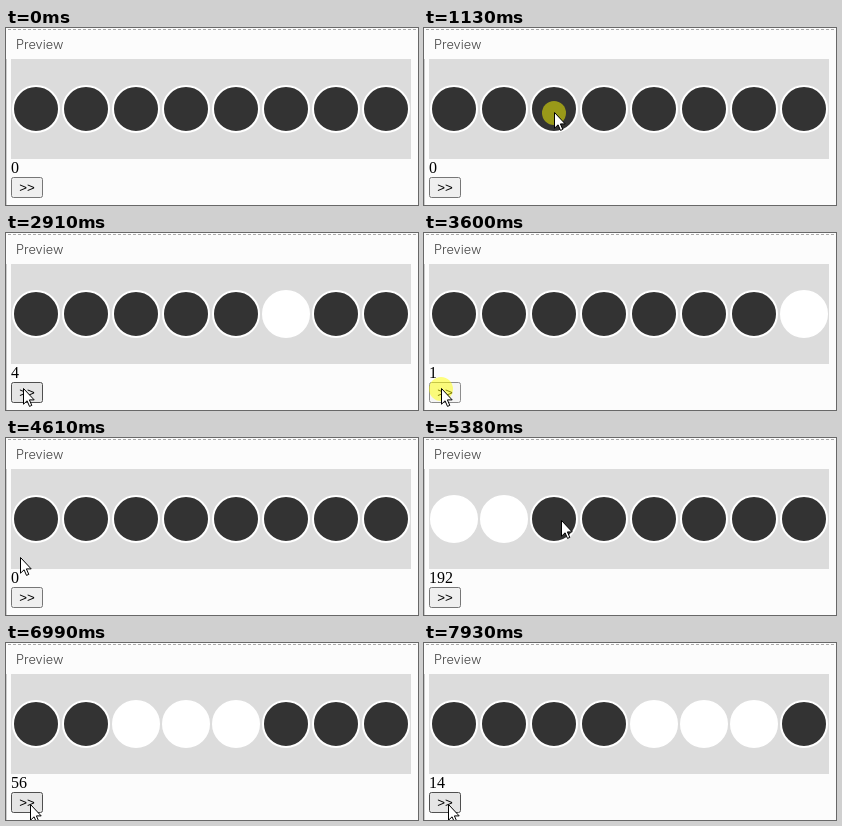
Animation of 412x177 px, one loop 8 s. Source, as an HTML page:

```html
<!DOCTYPE html>
<html lang="en">
<head>
<meta charset="utf-8">
<title>Bit shift preview</title>
<style>
  html, body { margin: 0; width: 100%; height: 100%; overflow: hidden; background: #fcfcfc; }
  svg { display: block; width: 100vw; height: 100vh; }
  #title { font: 300 12.8px Inter, sans-serif; fill: #444; }
  #number { font: 16px "Liberation Serif", serif; }
  #label { font: 13.333px "Liberation Sans", sans-serif; text-anchor: middle; }
</style>
</head>
<body>
<svg viewBox="0 0 412 177">
  <rect width="412" height="177" fill="#fcfcfc"/>
  <path d="M2 1.5H412" stroke="#aaa" stroke-dasharray="3 2"/>
  <path d="M.5 31V177" stroke="#ccc"/>
  <text id="title" x="10" y="21">Preview</text>
  <rect x="5" y="31" width="400" height="100" fill="#dcdcdc"/>
  <g id="bulbs" stroke="#fff" stroke-width="2"></g>
  <text id="number" x="5" y="145">0</text>
  <rect id="button" x="5.5" y="149.5" width="31" height="20" rx="2"/>
  <text id="label" x="21" y="164">&gt;&gt;</text>
  <g id="pointer">
    <circle id="glow" cy="1" r="12" fill="#ff0" fill-opacity=".5"/>
    <path d="M.5.5V16.2L4.1 12.8 6.5 18.4 8.8 17.4 6.4 11.9H11.2Z" fill="#fff" stroke="#000"/>
  </g>
</svg>
<script>
const $ = id => document.getElementById(id);
const LOOP = 8000, STEP = 77;

const bulbs = Array.from({ length: 8 }, (_, i) => {
  const bulb = document.createElementNS('http://www.w3.org/2000/svg', 'circle');
  bulb.setAttribute('cx', 30 + 50 * i);
  bulb.setAttribute('cy', 81);
  bulb.setAttribute('r', 23);
  return $('bulbs').appendChild(bulb);
});

const timeline = [{ time: 0, x: 237, y: 159, visible: false, down: false, value: 0 }];
const last = () => timeline[timeline.length - 1];
const after = (time, steps) => Math.floor((time + steps * STEP) / 10) * 10;
const set = (time, change) => timeline.push({ ...last(), ...change, time });

function glide(time, steps, x, y) {
  const from = last();
  for (let i = 1; i <= steps; i++) {
    const p = i / steps;
    set(after(time, i - 1), {
      x: from.x + (x - from.x) * p,
      y: from.y + (y - from.y) * p,
      visible: true
    });
  }
}

function click(time, delay, hold, nextValue) {
  if (delay) set(time, { down: true });
  set(after(time, delay), { down: true, value: nextValue(last().value) });
  set(after(time, delay + hold), { down: false });
}

const shift = value => value >> 1;
const toggle = bulb => value => value ^ (128 >> bulb);

glide(590, 7, 130, 84);
click(1130, 1, 1, toggle(2));
glide(1450, 4, 20, 155);
click(1760, 1, 1, shift);
glide(1990, 1, 18, 155);
click(2290, 1, 1, shift);
glide(2530, 1, 17, 155);
click(2750, 1, 1, shift);
click(3220, 1, 1, shift);
click(3600, 0, 2.3, shift);
glide(3770, 1, 16, 157);
glide(4150, 1, 15, 158);
click(4150, 1, 1, shift);
glide(4530, 2, 14, 119);
glide(4690, 1, 25, 88);
click(4760, 1, 1, toggle(0));
glide(4910, 3, 92, 82);
click(5150, 1, 1, toggle(1));
glide(5380, 1, 137, 82);
glide(5460, 1, 140, 82);
click(5460, 1, 1, toggle(2));
glide(5610, 7, 24, 161);
click(6300, 1, 1, shift);
click(6840, 1, 1, shift);
click(7390, 0, 1, shift);
click(7850, 0, 1, shift);

const BUTTON_LOOK = {
  idle: ['#efefef', '#767676'],
  hover: ['#e5e5e5', '#4f4f4f'],
  active: ['#f5f5f5', '#8d8d8d']
};

function draw(now) {
  const time = now % LOOP;
  const { x, y, visible, down, value } = timeline.findLast(state => state.time <= time);
  const over = visible && x >= 5 && x <= 37 && y >= 149 && y <= 170;
  const [fill, stroke] = BUTTON_LOOK[over ? (down ? 'active' : 'hover') : 'idle'];

  bulbs.forEach((bulb, i) => bulb.setAttribute('fill', value & (128 >> i) ? '#fff' : '#333'));
  $('number').textContent = value;
  $('button').setAttribute('fill', fill);
  $('button').setAttribute('stroke', stroke);
  $('pointer').setAttribute('transform', `translate(${Math.round(x)} ${Math.round(y)})`);
  $('pointer').setAttribute('visibility', visible ? 'visible' : 'hidden');
  $('glow').setAttribute('opacity', down ? 1 : 0);
}

const start = performance.now();
function tick() {
  draw(performance.now() - start);
  requestAnimationFrame(tick);
}
tick();
</script>
</body>
</html>
```
